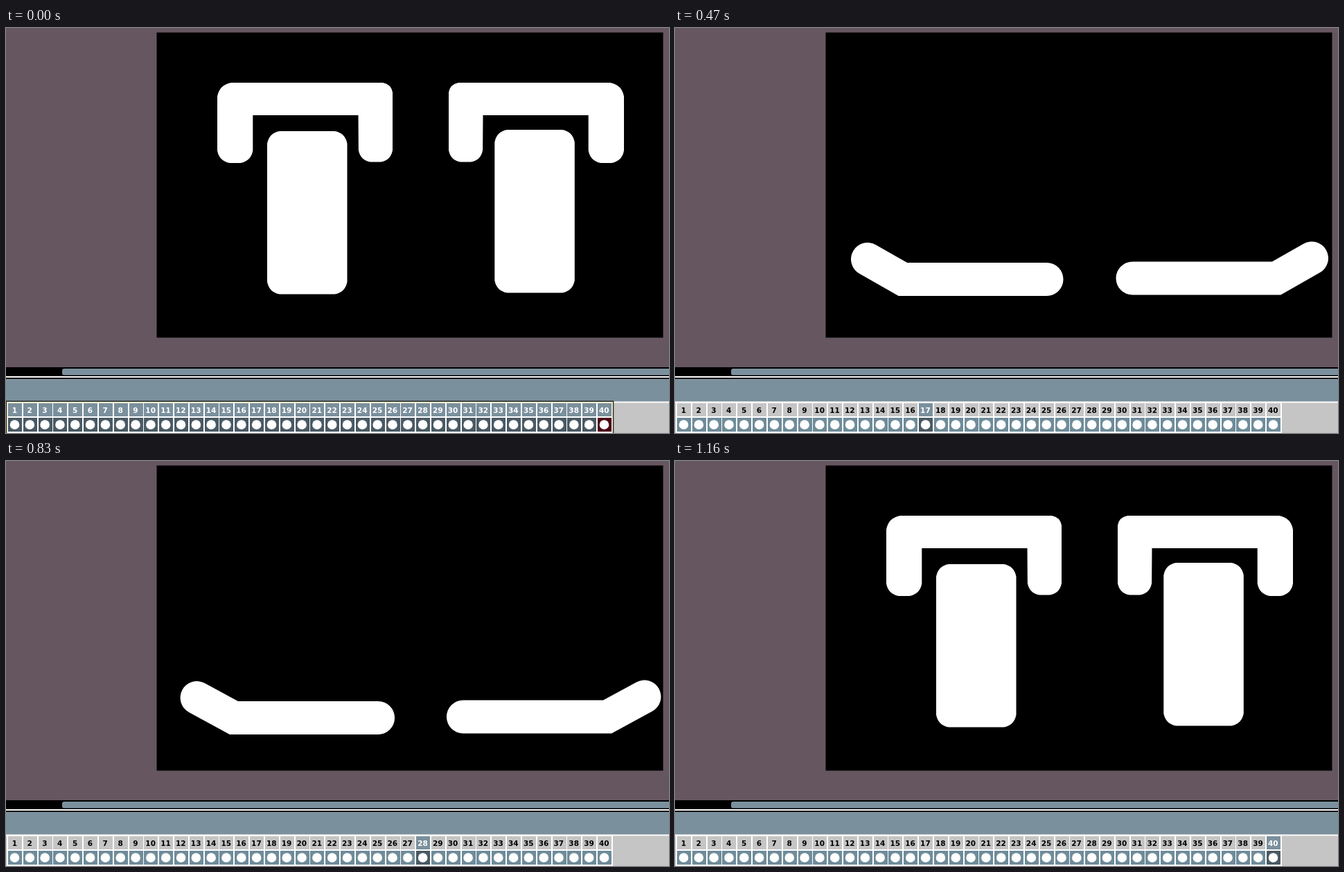
Write an HTML page that moves like this. It is 957 px wide and 585 px high and loops after 1180 ms.

```html
<!DOCTYPE html>
<html lang="en">
<head>
<meta charset="utf-8">
<title>Blinking eyes</title>
<style>
html, body { margin: 0; width: 100%; height: 100%; overflow: hidden; background: #665660; }
svg { display: block; width: 100vw; height: 100vh; }
text { font: bold 10.5px "DejaVu Sans", sans-serif; text-anchor: middle; }
</style>
</head>
<body>
<svg id="stage" viewBox="0 0 957 585" preserveAspectRatio="none"></svg>
<script>
const stage = document.getElementById("stage");
const LOOP = 1180, CELLS = 40, PITCH = 851 / 39;
const SLATE = "#7b909d", GREY = "#c5c5c5", CEL = "#6f8c9a";

function add(parent, tag, attrs) {
  const el = document.createElementNS("http://www.w3.org/2000/svg", tag);
  for (const k in attrs) el.setAttribute(k, attrs[k]);
  parent.appendChild(el);
  return el;
}
const rect = (parent, x, y, width, height, fill, more) =>
  add(parent, "rect", { x, y, width, height, fill, ...more });

// Editor window
rect(stage, 0, 0, 957, 585, "#665660");
rect(stage, 217.5, 447, 731, 1, "#4a4141");
rect(stage, 217.5, 6.5, 731, 440.5, "#000");
rect(stage, 0, 490, 957, 17, "#000");
rect(stage, 81, 492, 890, 9.5, SLATE, { rx: 3 });
rect(stage, 0, 503, 957, 2, "#fff");
rect(stage, 0, 507, 957, 33, SLATE);
rect(stage, 0, 539.5, 957, 46, GREY);
rect(stage, 0, 539.5, 957, 2, "#f8f8f8");

// Cel strip
rect(stage, 1, 540, 875, 45, "#fff");
const cells = Array.from({ length: CELLS }, (_, i) => {
  const cx = 12 + i * PITCH, x = Math.round(cx - 9);
  const head = rect(stage, x, 542, 20, 19, GREY);
  const cel = rect(stage, x, 563, 20, 20, CEL);
  const label = add(stage, "text", { x: cx + 0.3, y: 555.5 });
  label.textContent = i + 1;
  add(stage, "circle", { cx: cx + 0.5, cy: 573, r: 6.8, fill: "#fff" });
  return { head, cel, label };
});
const frame = add(stage, "g", { fill: "none", "stroke-width": 1.5 });
add(frame, "rect", { x: 0.5, y: 539.2, width: 876, height: 50, stroke: "#222" });
add(frame, "rect", { x: 2, y: 540.7, width: 873, height: 50, stroke: "#ecebc0" });

// Eyes: the left one is built, the right one follows by transform
const clip = add(add(stage, "defs", {}), "clipPath", { id: "panel" });
rect(clip, 217.5, 6.5, 730, 440.5, "#fff");
const eyes = add(stage, "g", { fill: "#fff", "clip-path": "url(#panel)" });
const pair = (attrs, transform) =>
  [add(eyes, "path", attrs), add(eyes, "path", { ...attrs, transform })];
const lids = pair({}, "translate(1197 0) scale(-1 1)");
const stems = pair({}, "translate(328.3 -2)");
const lines = pair({ fill: "none", stroke: "#fff", "stroke-width": 48, "stroke-linecap": "round" },
  "translate(1197 -1.5) scale(-1 1)");

const mix = (a, b, k) => a + (b - a) * k;
const between = (p, q, k) => [mix(p[0], q[0], k), mix(p[1], q[1], k)];

// Polygon with bevelled, slightly bulging corners; a point is [x, y, radius]
function bevel(pts) {
  const n = pts.length;
  const cut = (p, q) =>
    between(p, q, Math.min(p[2] / Math.hypot(q[0] - p[0], q[1] - p[1]), 0.5));
  return pts.map((p, i) => {
    const from = cut(p, pts[(i + n - 1) % n]), to = cut(p, pts[(i + 1) % n]);
    return `${i ? "L" : "M"}${from} Q${between(p, between(from, to, 0.5), 0.3)} ${to}`;
  }).join(" ") + "Z";
}

const show = (lid, stem, line) =>
  [[lids, lid], [stems, stem], [lines, line]].forEach(([paths, d]) =>
    paths.forEach(p => p.setAttribute("d", d)));

// drop lowers the lid, lift raises the foot of the stem and splays it
function open(drop, lift) {
  const s = lift / 47.5, wide = drop * 0.025;
  const left = 305 + 6.3 * s - wide, right = 558 - 3.5 * s + wide, foot = 558 + s + wide;
  const top = 79 + drop, under = top + 47 - 3.5 * s, end = top + 116 - 7 * s;
  const stemTop = 149 + 0.86 * drop, stemEnd = 384.5 - lift + Math.max(0, wide);
  show(
    bevel([
      [left, top, 20], [right, top, 14], [foot, end - 1.5, 17], [foot - 49, end - 1.5, 17],
      [508.5 + wide, under, 0], [left + 51.3, under, 0], [left + 51.3, end, 18], [left, end, 18]
    ]),
    bevel([
      [377 + s - wide, stemTop, 18], [492.5 + wide, stemTop, 18],
      [492.5 + 5 * s + wide, stemEnd, 18], [377 - 3.5 * s, stemEnd, 18]
    ]),
    "");
}

const closed = dy =>
  show("", "", `M${278 - 0.3 * dy} ${334 + dy}L329 ${363 + dy}H${536.5 + 0.07 * dy}`);

// Cel numbers where each blink falls, shuts, is lowest, opens and comes to rest
const BLINKS = [
  { fall: 10, pace: 1, shut: 15, low: 19, depth: 8, curve: 2, open: 21, rest: 24, ease: 2 },
  { fall: 24, pace: 1.5, shut: 27, low: 30, depth: 36, curve: 7, open: 33, rest: 40, ease: 6 }
];

function pose(n) {
  const b = BLINKS.find(blink => n <= blink.rest);
  if (n < BLINKS[0].fall) {
    open(-34 * Math.sin(Math.PI * (n - 1) / 9), 0);
  } else if (n < b.shut) {
    const p = (n - b.fall) * b.pace;
    open(8.25 * p * p, 23.75 * p);
  } else if (n < b.open) {
    closed(b.depth - b.curve * (n - b.low) ** 2);
  } else {
    open(43.5 * ((b.rest - n) / b.ease) ** 2, 0);
  }
}

// Playhead: time, cel and the number of even steps to the next key
const KEYS = [
  [40, 1, 10], [350, 12, 3], [470, 17, 1], [530, 19, 5], [680, 24, 1],
  [740, 25, 3], [830, 28, 4], [990, 34, 6], [1160, 40, 1]
];

function celAt(t) {
  const i = KEYS.findLastIndex(key => key[0] <= t);
  const [t0, n0, steps] = KEYS[i], [t1, n1] = KEYS[i + 1] || [LOOP, n0];
  return Math.round(mix(n0, n1, Math.floor((t - t0) / (t1 - t0) * steps) / steps));
}

function draw(t) {
  const all = t < KEYS[0][0], n = all ? CELLS : celAt(t);
  pose(n);
  frame.setAttribute("visibility", all ? "visible" : "hidden");
  cells.forEach(({ head, cel, label }, i) => {
    const on = i + 1 === n, lit = all || on;
    head.setAttribute("fill", lit ? SLATE : GREY);
    label.setAttribute("fill", lit ? "#fff" : "#000");
    cel.setAttribute("fill", all && on ? "#4d0016" : lit ? "#4a5a64" : CEL);
  });
}

const start = performance.now();
function tick() {
  draw(Math.max(0, performance.now() - start) % LOOP);
  requestAnimationFrame(tick);
}
tick();
</script>
</body>
</html>
```
